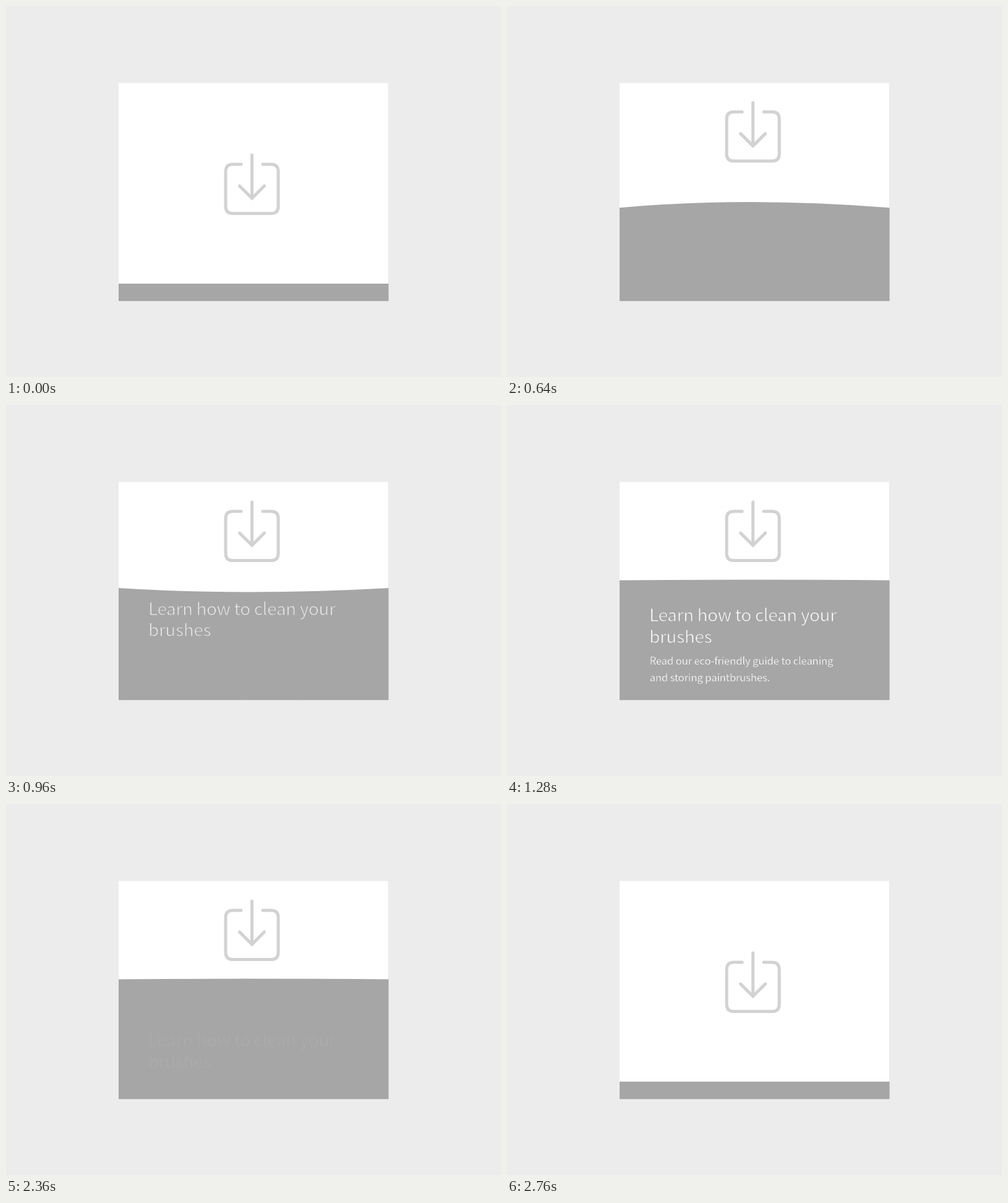
Write an HTML page that moves like this. It is 800x600 px and loops after 2880 ms.

```html
<!DOCTYPE html>
<html lang="en">
<head>
<meta charset="utf-8">
<style>
  html, body { margin: 0; width: 100%; height: 100%; overflow: hidden; background: #ececec; }
  svg { display: block; width: 800px; height: 600px; }
  /* The panel-coloured outline thins the letters to a light weight. */
  text {
    font-family: "Noto Sans CJK JP", "Noto Sans CJK SC", "Noto Sans CJK", "Noto Sans", sans-serif;
    font-weight: 300; fill: #fff; stroke: #a6a6a6; stroke-linejoin: round;
  }
  #title { font-size: 28px; letter-spacing: -0.4px; stroke-width: 0.9px; }
  #sub { font-size: 16.85px; letter-spacing: -0.25px; stroke-width: 0.35px; }
</style>
</head>
<body>
<svg viewBox="0 0 800 600">
  <clipPath id="card"><rect x="182" y="124.5" width="436" height="352.5"/></clipPath>
  <rect x="182" y="124.5" width="435.5" height="352" fill="#fff"/>
  <g id="icon" fill="none" stroke="#d2d2d2" stroke-width="5" stroke-linecap="round">
    <path d="M380 256H366.500Q355 256 355 267.500V324Q355 335.500 366.500 335.500H428.500Q440 335.500 440 324V267.500Q440 256 428.500 256H415"/>
    <path d="M397.500 241V311M377.500 291L397.500 311L417.500 291"/>
  </g>
  <path id="panel" fill="#a6a6a6"/>
  <g clip-path="url(#card)">
    <g id="title">
      <text x="230" y="350">Learn how to clean your</text>
      <text x="230" y="384.500">brushes</text>
    </g>
    <g id="sub">
      <text x="230.500" y="421">Read our eco-friendly guide to cleaning</text>
      <text x="230.500" y="448">and storing paintbrushes.</text>
    </g>
  </g>
</svg>
<script>
const LOOP = 2880, STEP = 40;
const [icon, panel, title, sub] = ["icon", "panel", "title", "sub"].map(id => document.getElementById(id));

const linear = k => k;
const inOut = k => k * k * (3 - 2 * k);
const outSoft = k => 1 - (1 - k) ** 1.55;
const outBack = k => 1 + 2.70158 * (k - 1) ** 3 + 1.70158 * (k - 1) ** 2;

const tween = (t, from, to, ease = inOut) => ease(Math.min(1, Math.max(0, (t - from) / (to - from))));

function place(el, y, alpha = 1) {
  el.setAttribute("transform", `translate(0 ${y})`);
  el.setAttribute("opacity", alpha);
}

// Text springs up from below the card, then sinks and fades to a faint rest.
function placeText(el, t, start, faint) {
  const rise = tween(t, start, start + 400, outBack);
  const sink = tween(t, 2080, 2360);
  const shown = tween(t, start, start + 240, linear);
  const fade = Math.max(faint, 1 - tween(t, 2080, 2360, linear));
  place(el, 160 * (1 - rise) + 42 * sink, t < 2520 ? shown * fade : 0);
}

function draw(now) {
  const t = Math.floor(now % LOOP / STEP) * STEP;
  const close = tween(t, 2480, 2760);
  place(icon, 84 * (close - tween(t, 474, 914, outBack)));

  // The panel shoots up, dips past its rest and settles; its crest swings further than its edges.
  const rise = tween(t, 480, 760, outSoft), dip = tween(t, 760, 960), settle = tween(t, 960, 1040);
  const edge = 449 - 168 * rise + 15 * dip - 12.5 * settle + 165.5 * close;
  const crest = 449 - 180.5 * rise + 34 * dip - 20 * settle + 166.5 * close;
  panel.setAttribute("d", `M182 ${edge}Q385 ${2 * crest - edge} 618.3 ${edge}V477.3H182Z`);

  placeText(title, t, 780, 0.07);
  placeText(sub, t, 900, 0);
}

const start = performance.now();
function frame() {
  draw(performance.now() - start);
  requestAnimationFrame(frame);
}
frame();
</script>
</body>
</html>
```
